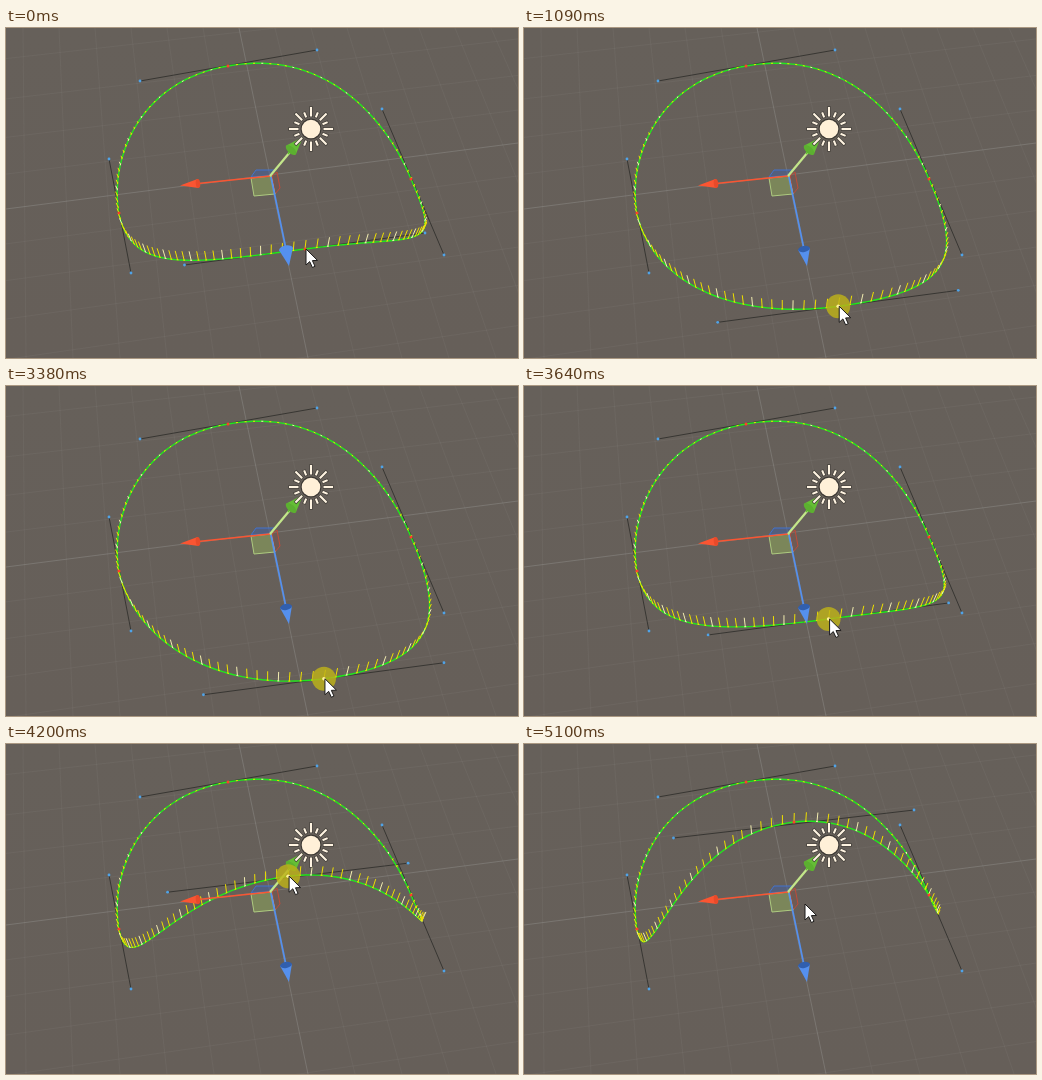
These frames come from a looping animation (512 px wide and 330 px high, 5150 ms). An HTML page with a canvas:

```html
<!DOCTYPE html>
<html lang="en">
<head>
<meta charset="utf-8">
<title>Spline editing</title>
<style>
html, body { margin: 0; width: 100%; height: 100%; overflow: hidden; background: #66605a; }
canvas { display: block; }
</style>
</head>
<body>
<canvas id="stage" width="512" height="330"></canvas>
<script>
const ctx = document.getElementById('stage').getContext('2d');
const LOOP = 5150;
const STEPS = 30; // ticks per curve segment
const RELEASE = 4830;

const clamp = u => Math.min(1, Math.max(0, u));
const span = (t, from, to) => clamp((t - from) / (to - from));
const mix = (a, b, u) => a.map((v, i) => v + (b[i] - v) * u);
const smooth = u => u * u * (3 - 2 * u);
const easeOut = u => 1 - (1 - u) ** 1.65;

// The dragged knot goes down, rests, then goes up.
function knotAt(t) {
  const start = [299, 221], low = [318, 293], high = [270, 78];
  if (t > 3380) return mix(low, high, easeOut(span(t, 3380, RELEASE)));
  const nudged = mix(start, [300, 223], span(t, 70, 200));
  return mix(nudged, low, smooth(span(t, 400, 1380)));
}

function mouseAt(t) {
  const [x, y] = knotAt(t);
  const away = mix([x + 1, y], [306, 146], span(t, RELEASE, 4950));
  return mix(away, [281, 160], span(t, 4950, 5100));
}

function line(x1, y1, x2, y2, color, width = 1) {
  ctx.strokeStyle = color;
  ctx.lineWidth = width;
  ctx.beginPath();
  ctx.moveTo(x1, y1);
  ctx.lineTo(x2, y2);
  ctx.stroke();
}

function poly(points, fill, stroke) {
  ctx.beginPath();
  points.forEach(p => ctx.lineTo(...p));
  ctx.closePath();
  ctx.fillStyle = fill;
  ctx.fill();
  if (!stroke) return;
  ctx.strokeStyle = stroke;
  ctx.lineWidth = 1;
  ctx.stroke();
}

function dot(x, y, r, color) {
  ctx.fillStyle = color;
  ctx.beginPath();
  ctx.arc(x, y, r, 0, Math.PI * 2);
  ctx.fill();
}

function drawFloor() {
  const g = ctx.createLinearGradient(0, 0, 0, 330);
  g.addColorStop(0, '#66605a');
  g.addColorStop(1, '#665f59');
  ctx.fillStyle = g;
  ctx.fillRect(0, 0, 512, 330);
  for (let k = -8; k <= 8; k++) {
    const color = `rgba(205,210,210,${k ? 0.05 : 0.19})`;
    const bend = 0.9 * k * Math.abs(k);
    line(233 + 36 * k, 0, 302 + 47 * k, 330, color);
    line(0, 181 + 34 * k + bend, 512, 115 + 32 * k + bend, color);
  }
}

// Cubic seen in perspective: lower points are nearer and weigh less.
function cubic(points, u) {
  const v = 1 - u;
  const basis = [v * v * v, 3 * v * v * u, 3 * v * u * u, u * u * u];
  let x = 0, y = 0, sum = 0;
  points.forEach((p, i) => {
    const w = basis[i] / (1080 + p[1]);
    x += w * p[0];
    y += w * p[1];
    sum += w;
  });
  return [x / sum, y / sum];
}

function drawSpline(x, y, selected) {
  const lift = clamp((221 - y) / 120);
  const knots = [
    { p: [113, 185], from: [103, 131], to: [125, 245] },
    { p: [x, y], from: [x - 120.5, y + 16], to: [x + 120, y - 16 + 4 * lift] },
    { p: [405, 151], from: [438, 227], to: [376, 81] },
    { p: [222, 38], from: [311, 22], to: [134, 53] }
  ];
  const segments = knots.map((k, i) => {
    const n = knots[(i + 1) % 4];
    return [k.p, k.to, n.from, n.p];
  });

  for (const k of knots) line(...k.from, ...k.to, '#33312e', 0.9);

  ctx.strokeStyle = '#20e81c';
  ctx.lineWidth = 1.4;
  ctx.beginPath();
  for (const s of segments)
    for (let i = 0; i < 60; i++) ctx.lineTo(...cubic(s, i / 60));
  ctx.closePath();
  ctx.stroke();

  for (const s of segments) {
    for (let i = 0; i < STEPS; i++) {
      const [px, py] = cubic(s, i / STEPS);
      const [qx, qy] = cubic(s, (i + 0.2) / STEPS);
      const len = Math.hypot(qx - px, qy - py), tx = (qx - px) / len, ty = (qy - py) / len;
      const size = 9 * ((1 + tx) / 2) ** 1.3;
      const lean = (px - 260) / 150 * 0.45;
      const color = i % 4 == 2 ? '#f2edb0' : '#eee000';
      line(px - tx, py - ty, px + tx, py + ty, color);
      line(px, py, px + lean * size, py - size, color);
    }
  }

  for (const k of knots) {
    dot(...k.from, 1.4, '#4fa3e8');
    dot(...k.to, 1.4, '#4fa3e8');
    dot(...k.p, 1.5, '#ff4028');
  }
  if (selected) dot(x, y, 2.4, '#a01010');
}

function drawArrow(start, base, tip, half, color, cap) {
  const [dx, dy] = [tip[0] - base[0], tip[1] - base[1]];
  const len = Math.hypot(dx, dy), nx = -dy / len * half, ny = dx / len * half;
  line(...start, ...base, color, 1.7);
  poly([tip, [base[0] + nx, base[1] + ny], [base[0] - nx, base[1] - ny]], color);
  ctx.fillStyle = cap;
  ctx.beginPath();
  ctx.ellipse(...base, half, half * 0.5, Math.atan2(ny, nx), 0, Math.PI * 2);
  ctx.fill();
}

function drawGizmo(lit) {
  poly([[245, 149], [250, 142], [268, 142], [264, 148]], 'rgba(60,95,170,.45)', '#4272cc');
  poly([[266, 148], [271, 144], [274, 160], [269, 166]], 'rgba(150,70,60,.2)', '#c04c3a');
  poly([[245, 150], [265, 148], [269, 166], [248, 168]], 'rgba(135,155,90,.65)', '#aecb80');
  drawArrow([264, 148], [192, 155.5], [174, 157.5], 4.5, '#fa5532', '#e84a2a');
  line(264, 148, 284, 124, '#c3e68a', 2.2);
  drawArrow([282, 126], [285, 122], [297, 109], 6.5, '#64be35', '#5cb030');
  drawArrow([265, 149], [280, 221], [283, 238], lit ? 7 : 6, '#5590ee', lit ? '#5590ee' : '#315fae');
}

function drawSun() {
  const rays = (color, width, extra) => {
    for (let i = 0; i < 16; i++) {
      const a = i * Math.PI / 8, c = Math.cos(a), s = Math.sin(a);
      const from = 12.5 - extra, to = (i % 2 ? 18 : 22) + extra;
      line(305 + c * from, 101 + s * from, 305 + c * to, 101 + s * to, color, width);
    }
  };
  rays('#3d3934', 3.4, 0.6);
  rays('#fff4e2', 2.1, 0);
  dot(305, 101, 10.5, '#3d3934');
  dot(305, 101, 9.3, '#fff0d8');
}

function drawCursor(x, y) {
  const shape = [[0, 0], [0, 16], [3.7, 12.6], [6.4, 18.5], [9, 17.3], [6.4, 11.6], [11.5, 11.4]];
  poly(shape.map(p => [x + p[0], y + p[1]]), '#fff', '#1c1b1a');
}

function draw(t) {
  const pressed = (t >= 70 && t < 1670) || (t >= 3380 && t < RELEASE);
  const [x, y] = knotAt(t);
  const [mx, my] = mouseAt(t);
  drawFloor();
  drawSpline(x, y, t >= 1670 && t < 3380);
  drawGizmo(t < 70);
  drawSun();
  if (pressed) {
    dot(x, y, 12, 'rgba(190,178,25,.82)');
    dot(x, y, 1.8, '#fff29a');
  }
  drawCursor(mx, my);
}

function frame() {
  draw(performance.now() % LOOP);
  requestAnimationFrame(frame);
}
frame();
</script>
</body>
</html>
```
